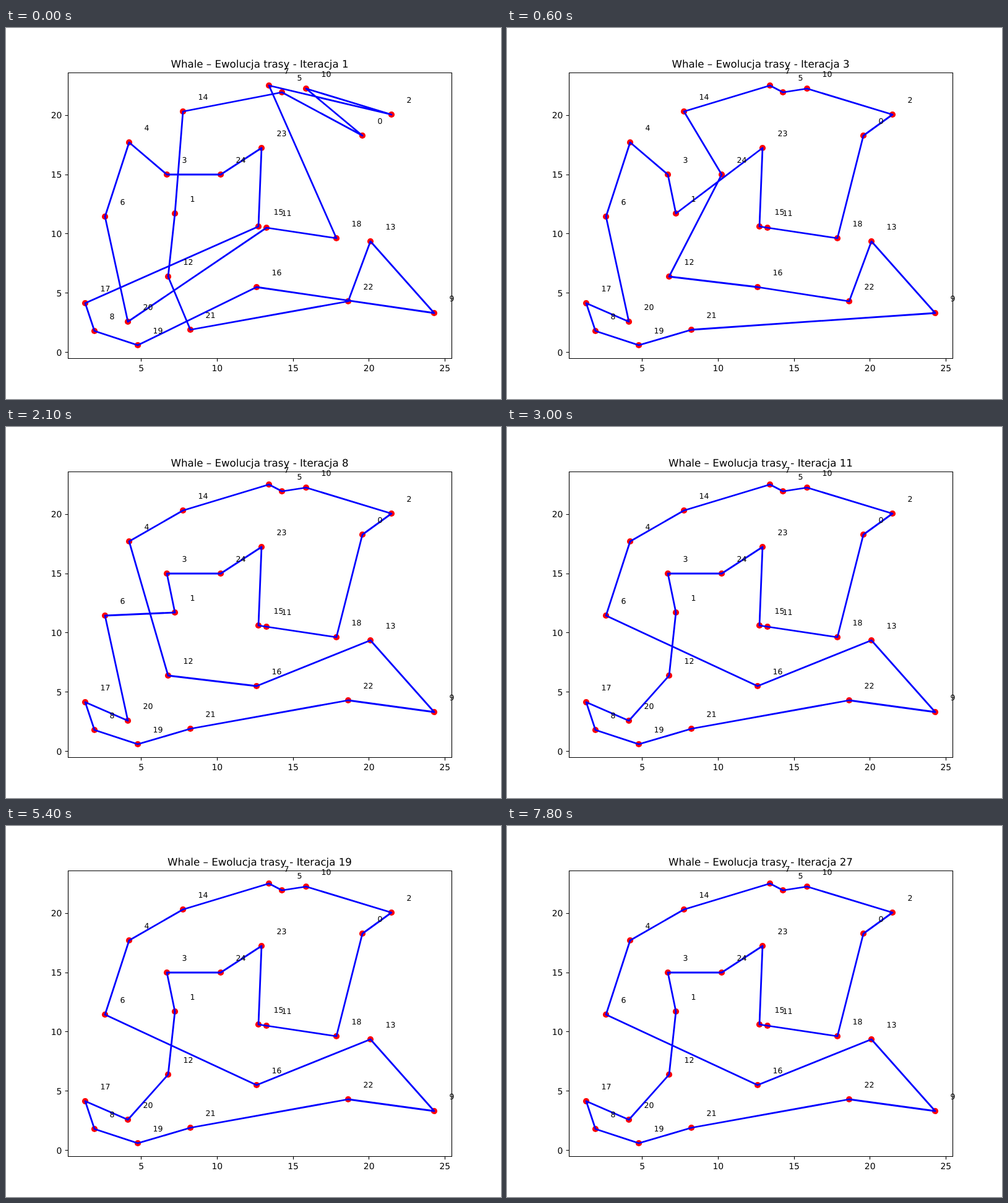
An HTML page for the animation above (8000 ms loop, 800 by 600 pixels).

```html
<!DOCTYPE html>
<html lang="pl">
<head>
<meta charset="utf-8">
<title>Ewolucja trasy</title>
<style>
  html, body { margin: 0; width: 100%; height: 100%; overflow: hidden; background: #fff; }
  svg { display: block; width: 800px; height: 600px; }
  text { font-family: "DejaVu Sans", sans-serif; fill: #000; text-rendering: geometricPrecision; }
</style>
</head>
<body>
<svg id="stage" viewBox="0 0 800 600"></svg>
<script>
(() => {
  const STEP = 300, LOOP = 8000;
  const UNIT_X = 24.53, UNIT_Y = 19.17;
  const stage = document.getElementById("stage");

  const cities = [
    [576, 174], [273, 300], [623, 140], [260, 237], [199, 185],
    [446, 104], [160, 305], [425, 93], [143, 490], [692, 461],
    [485, 98], [421, 323], [262, 402], [589, 345], [286, 135],
    [408, 321], [405, 419], [128, 445], [534, 340], [213, 513],
    [197, 475], [298, 488], [553, 442], [413, 194], [347, 237]
  ];

  const firstTour = [14, 5, 0, 10, 2, 7, 18, 11, 20, 6, 4, 3, 24, 23, 15, 17, 8, 19, 16, 9, 13, 22, 21, 12, 1];
  const betterTour = [14, 7, 5, 10, 2, 0, 18, 11, 15, 23, 1, 3, 4, 6, 20, 17, 8, 19, 21, 9, 13, 22, 16, 12, 24];

  // From the better tour on, pairs of cities trade places at these iterations
  const swaps = [
    { at: 5, pair: [1, 24] }, { at: 5, pair: [1, 4] }, { at: 5, pair: [9, 13] },
    { at: 7, pair: [13, 22] }, { at: 10, pair: [6, 12] }
  ];

  function tourAt(iteration) {
    if (iteration === 1) return firstTour;
    return swaps.filter(s => s.at <= iteration).reduce(
      (tour, { pair: [a, b] }) => tour.map(c => c === a ? b : c === b ? a : c),
      betterTour);
  }

  function add(tag, attrs, content = "") {
    const el = document.createElementNS("http://www.w3.org/2000/svg", tag);
    for (const key in attrs) el.setAttribute(key, attrs[key]);
    el.textContent = content;
    return stage.appendChild(el);
  }

  const label = (x, y, size, anchor, content) =>
    add("text", { x, y, "font-size": size, "text-anchor": anchor }, content);
  const axisLine = d => add("path", { d, fill: "none", stroke: "#000", "stroke-width": 1.11 });
  const snap = v => Math.floor(v) + 0.5;

  for (const [cx, cy] of cities) add("circle", { cx, cy, r: 5.1, fill: "#f00" });

  const route = add("path", {
    fill: "none", stroke: "#00f", "stroke-width": 2.78, "stroke-linejoin": "round"
  });

  axisLine("M100.5 72.5H720.5V534.5H100.5Z");
  for (let v = 5; v <= 25; v += 5) {
    const x = 96.05 + v * UNIT_X;
    axisLine(`M${snap(x)} 534.5v4.9`);
    label(x, 554.6, 13.89, "middle", v);
  }
  for (let v = 0; v <= 20; v += 5) {
    const y = 524.6 - v * UNIT_Y;
    axisLine(`M100.5 ${snap(y)}h-4.9`);
    label(90.3, y + 5, 13.89, "end", v);
  }

  cities.forEach(([x, y], i) => label(x + UNIT_X, y - UNIT_Y, 12.5, "start", i));
  const title = label(410, 63.8, 16.67, "middle", "");

  function draw(time) {
    const iteration = 1 + Math.floor((time % LOOP) / STEP);
    const points = tourAt(iteration).map(i => cities[i].join(" "));
    route.setAttribute("d", `M${points.join("L")}Z`);
    title.textContent = `Whale – Ewolucja trasy - Iteracja ${iteration}`;
  }

  const start = performance.now();
  function tick() {
    draw(performance.now() - start);
    requestAnimationFrame(tick);
  }
  tick();
})();
</script>
</body>
</html>
```
